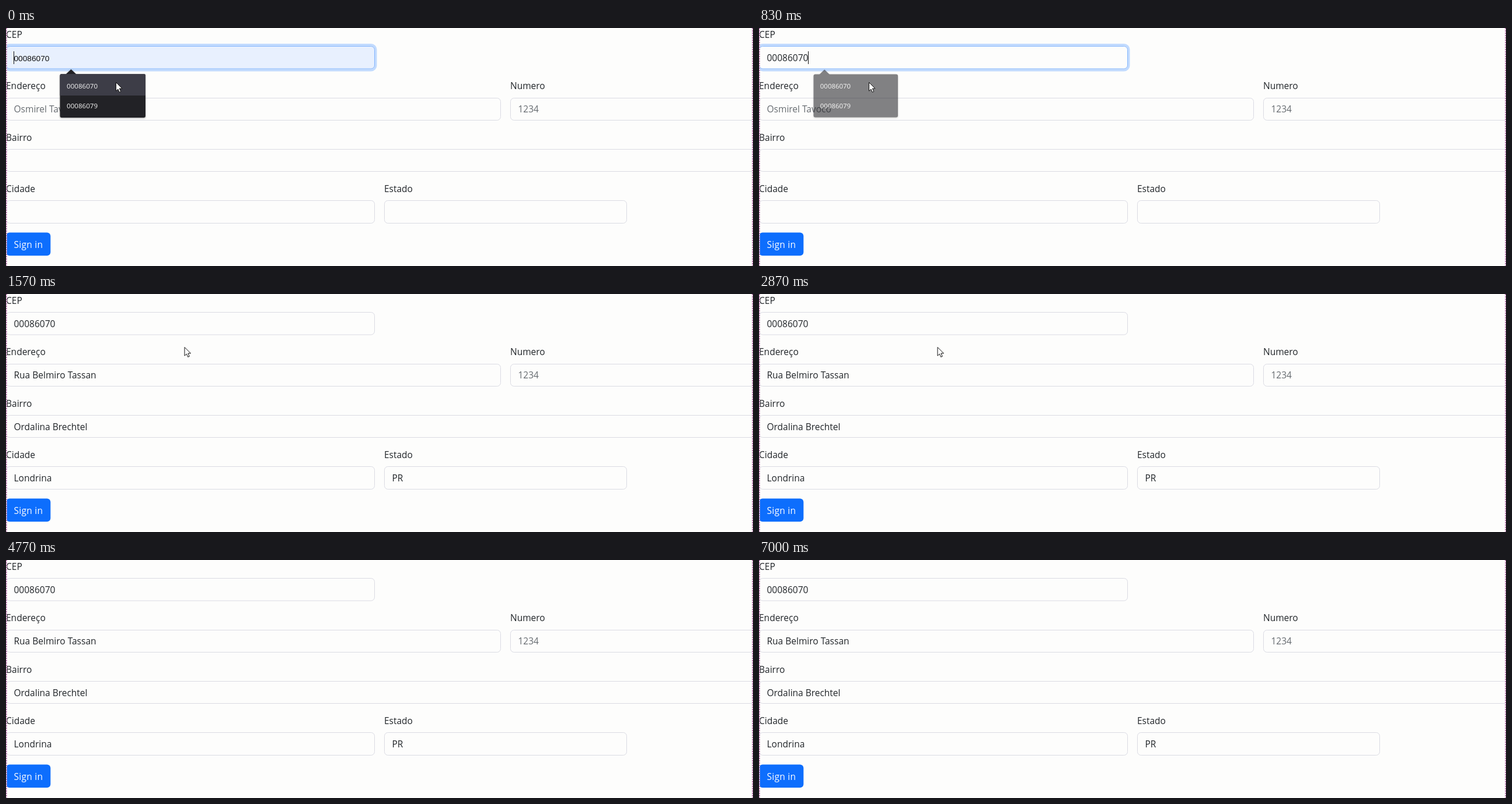
An HTML page that plays this animation: 1280x409 px, repeating every 7030 ms.

```html
<!DOCTYPE html>
<html lang="pt">
<head>
<meta charset="utf-8">
<title>CEP</title>
<style>
  html, body { margin: 0; width: 100%; height: 100%; overflow: hidden; background: #fdfdfc; }
  svg { display: block; width: 100%; height: 100%; }
  text { font: 15.5px "Open Sans", "Noto Sans", sans-serif; fill: #212529; white-space: pre; }
  .hint { fill: #666b70; }
  .field { fill: none; stroke: #dadbe3; }
  #preview { font: 13.7px "Liberation Sans", Arial, sans-serif; fill: #111; }
  #popup text { font-size: 11.6px; fill: #f4f4f4; }
</style>
</head>
<body>
<svg viewBox="0 0 1280 409" preserveAspectRatio="none">
  <defs>
    <filter id="shadow" x="-20%" y="-20%" width="140%" height="150%">
      <feDropShadow dx="0" dy="1" stdDeviation="1.5" flood-color="#000" flood-opacity=".35"/>
    </filter>
  </defs>
  <g id="form"></g>
  <g id="focus">
    <rect x="-1.5" y="29" width="635" height="43.5" rx="8" fill="none" stroke="#c2dbfe" stroke-width="4"/>
    <rect id="box" x=".5" y="31.5" width="631" height="38.5" rx="6" stroke="#86b7fe"/>
  </g>
  <text id="preview" x="13.5" y="57">00086070</text>
  <text id="cep" x="13.5" y="57">00086070</text>
  <rect id="caret" y="40" width="1" height="22" fill="#111"/>
  <rect y="351.5" width="76.3" height="39.7" rx="6" fill="#0d6efd"/>
  <text x="13.5" y="378" style="fill:#fff;letter-spacing:.25px">Sign in</text>
  <g id="popup" filter="url(#shadow)">
    <path d="M102.5 79.5L111.5 71L120.5 79.5Z" fill="#232326"/>
    <rect x="92.5" y="79" width="146.5" height="75" rx="3" fill="#232326"/>
    <path id="row" d="M92.5 116V82a3 3 0 0 1 3-3H236a3 3 0 0 1 3 3V116Z" fill="#3d3d47"/>
    <text x="104" y="104">00086070</text>
    <text x="104" y="138">00086079</text>
  </g>
  <rect id="bar" x="656" y="-8" width="115" height="10.5" rx="2" fill="#2b151f" filter="url(#shadow)"/>
  <path d="M.75 0V409M1279.25 0V409" stroke="#e9d3e3" stroke-width="1.5"/>
  <path d="M.75 0V409M1279.25 0V409" stroke="#a65f9c" stroke-width="1.5" stroke-dasharray="2 2"/>
  <path id="cursor" d="M.5 .5V15.2L3.9 12L6.2 17.3L8.7 16.2L6.4 11H11Z" fill="#fff" stroke="#111"/>
</svg>
<script>
const $ = id => document.getElementById(id);
const LOOP = 7030, ROW = 88.4;

// label, row, x and y of the field, width, height, hint, filled value
const fields = [
  ["CEP", 0, 0.5, 31.5, 631, 38.5, "", ""],
  ["Endereço", 1, 0.5, 120.5, 847, 38, "Osmirel Tavoco", "Rua Belmiro Tassan"],
  ["Numero", 1, 864.5, 120.5, 440, 38, "1234", ""],
  ["Bairro", 2, 0.5, 208.5, 1300, 38, "", "Ordalina Brechtel"],
  ["Cidade", 3, 0.5, 296.5, 631, 39, "", "Londrina"],
  ["Estado", 3, 648.5, 296.5, 415, 39, "", "PR"]
];

function add(tag, attrs, text = "") {
  const el = document.createElementNS("http://www.w3.org/2000/svg", tag);
  for (const k in attrs) el.setAttribute(k, attrs[k]);
  el.textContent = text;
  $("form").append(el);
  return el;
}

const values = fields.map(([label, row, x, y, width, height, hint, value]) => {
  const left = Math.floor(x), base = Math.round(17 + ROW * row);
  add("text", { x: left, y: base }, label);
  add("rect", { class: "field", x, y, width, height, rx: 6 });
  return { el: add("text", { x: left + 13.5, y: base + 40 }), hint, value };
});

const ramp = (t, a, b) => Math.min(1, Math.max(0, (t - a) / (b - a)));
const ease = p => p * p * (3 - 2 * p);
const show = (id, on) => $(id).setAttribute("opacity", +on);

function draw(t) {
  const picked = t >= 760, focused = t < 1200, filled = t >= 1420;

  show("preview", !picked);
  show("cep", picked);
  $("box").setAttribute("fill", picked ? "#fdfdfc" : "#e8f0fe");
  show("focus", 1 - ramp(t, 1200, 1350));
  show("caret", focused);
  $("caret").setAttribute("x", picked ? 84 : 13);

  const fade = ramp(t, 765, 915);
  const scale = 1 - 0.03 * fade;
  show("popup", 1 - fade);
  show("row", !picked);
  $("popup").setAttribute("transform",
    `translate(166 116) scale(${scale}) translate(-166 -116)`);

  for (const { el, hint, value } of values) {
    const done = filled && value;
    el.textContent = done ? value : hint;
    el.setAttribute("class", done ? "" : "hint");
  }

  const across = ease(ramp(t, 870, 1130)), away = ease(ramp(t, 3760, 4200));
  const x = 188 + 117.5 * across + 400 * away;
  const y = 93 - 2 * across - 115 * away;
  $("cursor").setAttribute("transform", `translate(${x} ${y})`);

  show("bar", t >= 5700 && t < 6400);
}

function tick() {
  draw(performance.now() % LOOP);
  requestAnimationFrame(tick);
}
tick();
</script>
</body>
</html>
```
